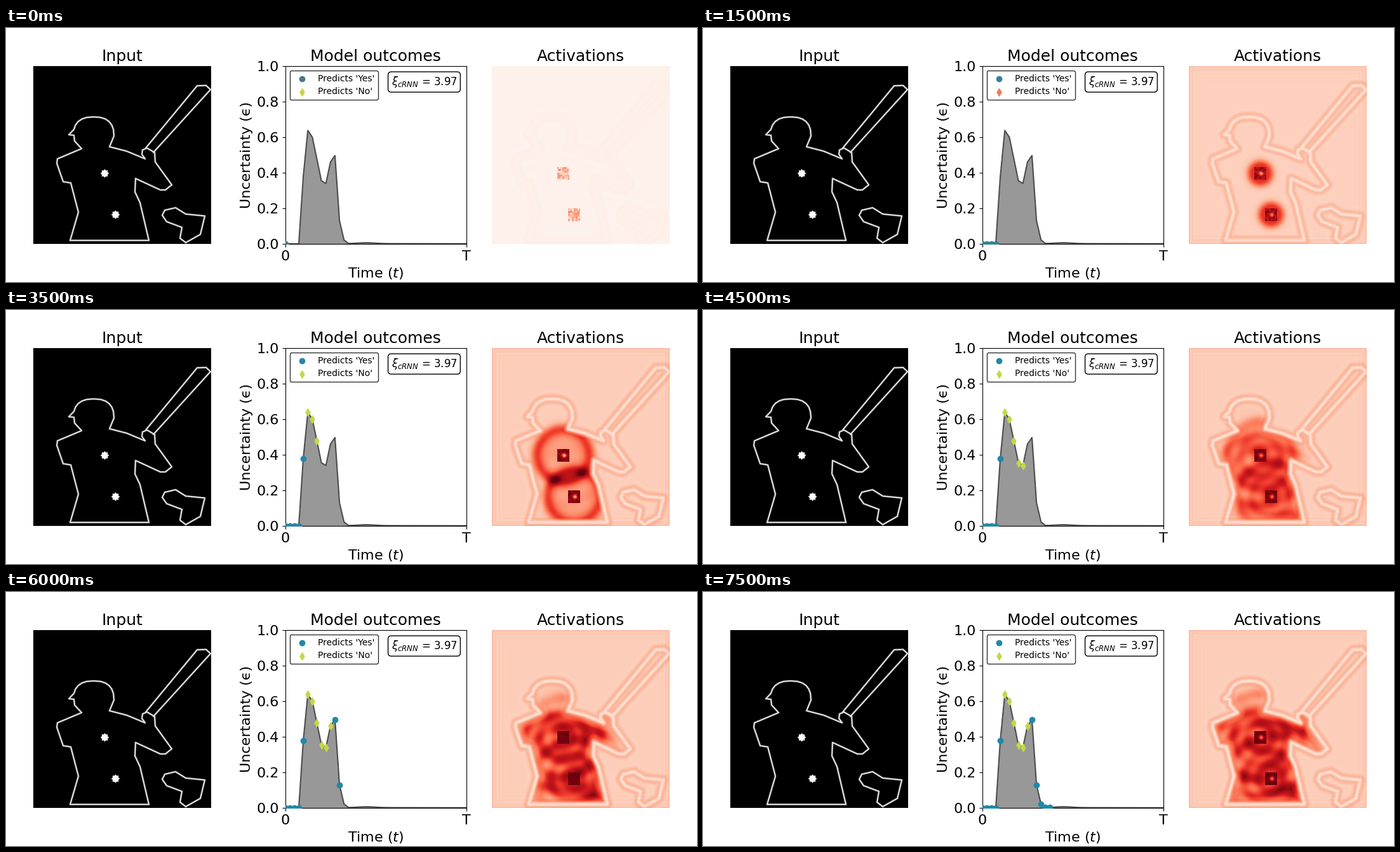
A matplotlib script for the animation above (8000 ms loop, 1088 by 400 pixels).

```python
import numpy as np
import matplotlib.pyplot as plt
from matplotlib.animation import FuncAnimation
from matplotlib.colors import to_rgb
from matplotlib.path import Path

W, H, SIZE = 1088, 400, 280
FRAMES, STEP_MS = 16, 500
LEFT, TOP = 43, 60

plt.rcParams["font.family"] = "DejaVu Sans"

# Outlines in stage pixels of the input panel
turn = np.linspace(0, np.pi, 13)
cap = np.c_[138 + 32 * np.sign(np.cos(turn)) * abs(np.cos(turn)) ** .8,
            170 - 30 * abs(np.sin(turn)) ** .8]
torso = [(99, 168), (107, 169), (108, 178), (119, 190), (81, 206), (80, 213),
         (90, 242), (102, 244), (114, 290), (101, 334.5), (225, 334.5),
         (211, 275), (203, 258), (204, 237), (243, 255), (251, 255),
         (261, 247), (235, 211), (234, 196), (222, 189), (215, 192),
         (214, 199), (219, 206), (190, 194), (163, 187), (170, 170)]
BODY = [*cap[:-1], *torso]
BAT = [(220, 189), (301, 91), (315, 90.5), (322, 97), (232, 196)]
MITT = [(246, 295), (250, 287), (267, 283), (283, 293), (313, 296), (306, 325),
        (283, 338), (274, 331), (277, 314), (253, 305), (246, 295)]
DOTS = [(155.5, 229), (172.5, 294)]

Y, X = np.mgrid[0:SIZE, 0:SIZE] + 0.5
X, Y = X + LEFT, Y + TOP


def line_dist(pts):
    best = np.full(X.shape, 1e9)
    for (x0, y0), (x1, y1) in zip(pts, pts[1:]):
        dx, dy = x1 - x0, y1 - y0
        t = np.clip(((X - x0) * dx + (Y - y0) * dy) / (dx * dx + dy * dy), 0, 1)
        best = np.minimum(best, np.hypot(X - x0 - t * dx, Y - y0 - t * dy))
    return best


def bump(d, center, width):
    return np.exp(-((d - center) / width) ** 2)


def sigmoid(v):
    return 1 / (1 + np.exp(-np.clip(v, -40, 40)))


body_dist = line_dist(BODY)
edge = np.minimum.reduce([body_dist, line_dist(BAT), line_dist(MITT)])
inside = Path(BODY).contains_points(np.c_[X.ravel(), Y.ravel()]).reshape(X.shape)
depth = inside * np.clip((body_dist - 2) / 12, 0, 1)
dot_dist = [np.hypot(X - x, Y - y) for x, y in DOTS]
near = np.minimum(*dot_dist)
border = np.minimum.reduce([X - LEFT, LEFT + SIZE - X, Y - TOP, TOP + SIZE - Y])
head = 0.45 + 0.55 * sigmoid((Y - 188) / 4)

rng = np.random.default_rng(4)
grain = np.kron(rng.random((94, 94)), np.ones((3, 3)))[:SIZE, :SIZE]
waves = rng.uniform((.12, 0, 0), (.24, np.pi, 2 * np.pi), (5, 3))


def input_image():
    img = np.exp(-edge ** 2 / 1.5)
    for (x, y), d in zip(DOTS, dot_dist):
        rim = 5.7 + 0.7 * np.cos(8 * np.arctan2(Y - y, X - x))
        img = np.maximum(img, np.clip(rim - d + 0.5, 0, 1))
    return img


def mottle(k):
    """Slowly drifting blotches plus rings that interfere between the dots."""
    blotch = sum(np.sin(f * (X * np.cos(a) + Y * np.sin(a)) + p + 0.45 * k)
                 for f, a, p in waves)
    rings = sum(np.cos((d - 33 - 2 * (k - 10)) / 3.8) for d in dot_dist)
    return .04 * blotch + .07 * rings


def spread(k):
    """Activity that grows from the dots as rings, then fills the body."""
    radius = 20 * (k - 2) ** .55
    rings = sum(.1 * sigmoid((radius - d) / 2) + .38 * bump(d, radius - 8, 9)
                for d in dot_dist)
    fill = .5 + .08 * np.tanh((X - 150) / 30) + mottle(k)
    fill *= sigmoid((radius - near) / 9) * head
    mix = np.clip((k - 6.5) / 3.5, 0, 1)
    soft = np.clip(2 * depth, 0, 1)
    return (1 - mix) * soft * rings + mix * (.4 * soft + .6 * depth) * fill


def activation(k):
    warm = 1 - np.exp(-k)
    gain = .02 + .06 * warm
    f = .02 + .17 * warm + gain * (bump(edge, 5, 3) - warm * bump(edge, 0, 2)
                                   - .12 * bump(edge, 12, 2.5))
    f += gain * (.8 * np.exp(-border / 3)
                 + .3 * np.cos(border * 1.05) * np.exp(-border / 12))
    if k >= 2:
        f += spread(k)
    level = .42 + .58 * warm
    rough = .35 * np.exp(-k / 6)
    glow = .75 * warm * abs(np.cos(np.pi * (k - 6) / 12))
    for (x, y), d in zip(DOTS, dot_dist):
        patch = np.maximum(abs(X - x), abs(Y - y)) < 10
        spot = np.exp(-((X - x - 1.5) ** 2 + (Y - y) ** 2) / 10)
        f = np.where(patch, level - rough * grain - glow * spot, f)
    return np.clip(f, 0, 1)


def panel(x, width, title):
    ax = fig.add_axes([x / W, 1 - (TOP + SIZE) / H, width / W, SIZE / H])
    ax.set_title(title, fontsize=18)
    return ax


def picture(x, title, data, cmap):
    ax = panel(x, SIZE, title)
    ax.axis("off")
    return ax.imshow(data, cmap=cmap, vmin=0, vmax=1, aspect="auto",
                     interpolation="nearest")


fig = plt.figure(figsize=(W / 100, H / 100), dpi=100, facecolor="white")
picture(LEFT, "Input", input_image(), "gray")
act = picture(765, "Activations", activation(0), "Reds")

# Uncertainty over the model steps: two peaks, then a long flat tail
steps = np.arange(41)
curve = .003 * np.exp(-steps / 30) + .005 * bump(steps, 18, 2.5)
curve[:4] = 0
curve[4:14] = [.38, .638, .6, .478, .355, .34, .46, .497, .13, .022]
says_no = (steps >= 5) & (steps <= 10)

ax = panel(439.6, 285, "Model outcomes")
ax.fill_between(steps, curve, color="#989898", linewidth=0)
ax.plot(steps, curve, color="#4c4c4c", lw=1.5)
yes, no = (ax.scatter([0], [0], marker=m, s=36, lw=1, zorder=3, label=f"Predicts '{s}'")
           for m, s in (("o", "Yes"), ("d", "No")))
ax.set(xlim=(0, 40), ylim=(0, 1))
ax.set_xticks([0, 40], ["0", "T"])
ax.tick_params(labelsize=16)
ax.set_xlabel("Time ($t$)", fontsize=16)
ax.set_ylabel("Uncertainty (\u03f5)", fontsize=16)
legend = ax.legend(loc="upper left", fontsize=10, edgecolor="black")
ax.text(0.95, 0.95, r"$\xi_{cRNN}$ = 3.97", transform=ax.transAxes, fontsize=12,
        ha="right", va="top",
        bbox=dict(boxstyle="round,pad=0.3", facecolor="white", edgecolor="black"))

DULL, BLUE = np.array(to_rgb("#4a7a88")), np.array(to_rgb("#1b8aad"))
LIME, CORAL = "#c4d748", "#e87e60"


def update(k):
    act.set_data(activation(k))
    shown = steps <= k
    blue = BLUE + (DULL - BLUE) * np.exp(-k / 5)
    groups = ((yes, shown & ~says_no, blue),
              (no, shown & says_no, CORAL if 1 <= k <= 3 else LIME))
    for (dots, pick, color), key in zip(groups, legend.legend_handles):
        dots.set_offsets(np.c_[steps[pick], curve[pick]])
        dots.set_color(color)
        key.set_color(color)
    return act, yes, no


anim = FuncAnimation(fig, update, frames=FRAMES, interval=STEP_MS,
                     repeat=True, repeat_delay=0, blit=False)
plt.show()
```
